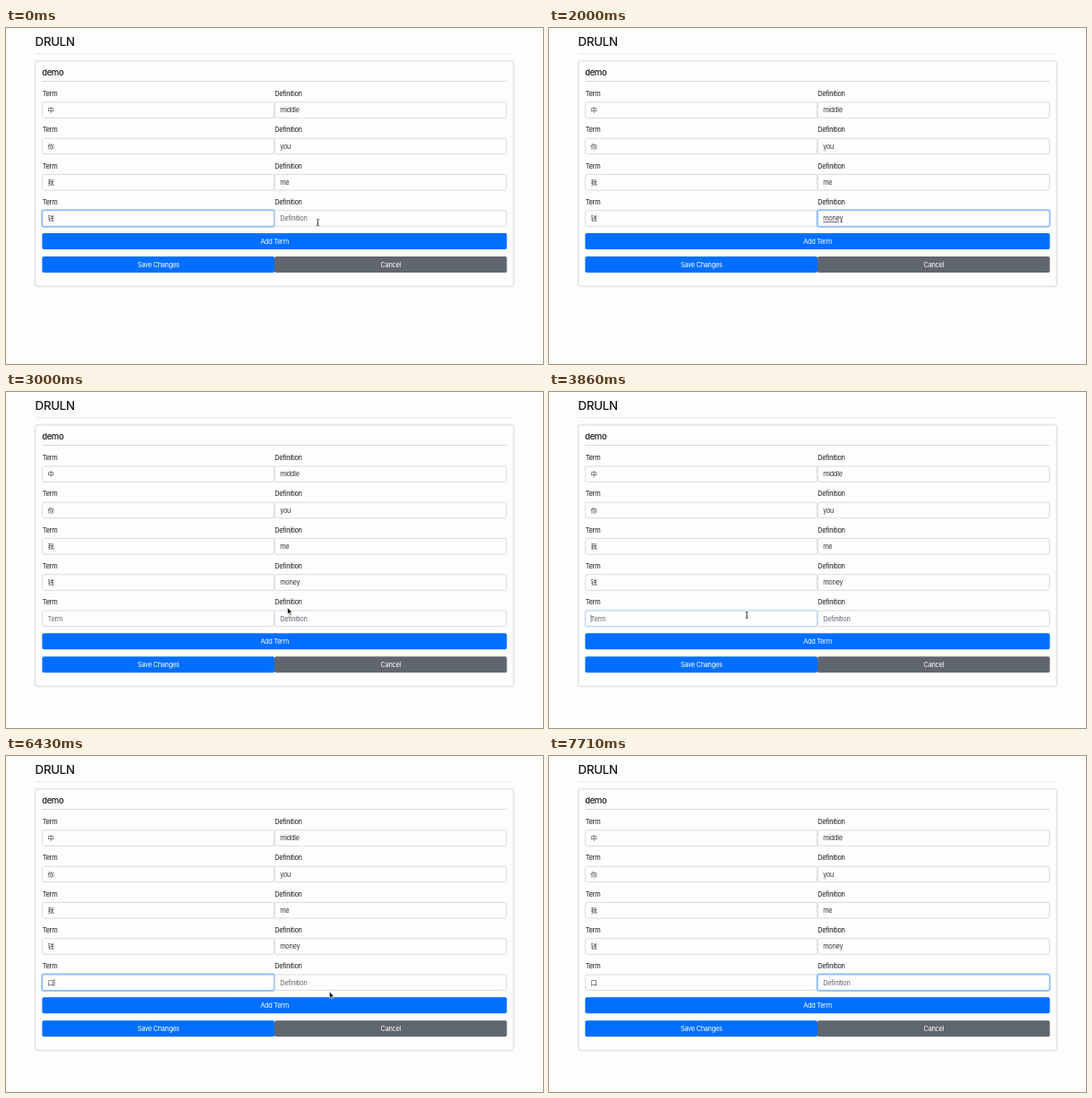
An HTML page that plays this animation: 600x375 px, repeating every 8 s.

```html
<!DOCTYPE html>
<html lang="zh-Hans">
<head>
<meta charset="utf-8">
<title>Flash card editor</title>
<style>
html, body { margin: 0; width: 100%; height: 100%; overflow: hidden; background: #fdfdfd; }
svg { display: block; width: 600px; height: 375px; }
text { font: 7.4px Inter, "Noto Sans CJK SC", "Noto Sans CJK", sans-serif; letter-spacing: -.3px; fill: #15181b; white-space: pre; }
.title { font-size: 13.3px; font-weight: 500; }
.deck { font-size: 9.5px; font-weight: 500; letter-spacing: -.4px; }
.value { fill: #343a40; }
.hint { fill: #626a72; }
.button { fill: #fff; text-anchor: middle; }
.card { fill: #fdfdfd; stroke: #d5d6d7; stroke-width: .7; filter: drop-shadow(0 .8px 1px rgba(0, 0, 0, .16)); }
</style>
</head>
<body>
<svg id="stage" viewBox="0 0 600 375"></svg>
<script>
const LOOP = 8000, STEP = 1000 / 7, PITCH = 40.3;
const BLUE = '#006fff', GREY = '#60666d';
const stage = document.getElementById('stage');

function add(parent, tag, attrs, content) {
  const el = document.createElementNS('http://www.w3.org/2000/svg', tag);
  set(el, attrs);
  if (content) el.textContent = content;
  parent.appendChild(el);
  return el;
}
function set(el, attrs) {
  for (const key in attrs) el.setAttribute(key, attrs[key]);
}
const show = (el, on) => set(el, { visibility: on ? 'visible' : 'hidden' });
const rule = (y, x1, x2, stroke) => add(stage, 'line', { x1, x2, y1: y, y2: y, stroke, 'stroke-width': .8 });
const mix = (a, b, p) => `rgb(${a.map((v, i) => Math.round(v + (b[i] - v) * p))})`;

// Latest value in a list of [step, value] pairs.
function at(list, k) {
  let value = list[0][1];
  for (const [start, v] of list) if (k >= start) value = v;
  return value;
}
// Straight move with ease between [step, x, y] points.
function along(points, k) {
  let i = 0;
  while (i < points.length - 2 && k >= points[i + 1][0]) i++;
  const [a, x, y] = points[i], [b, u, v] = points[i + 1];
  const p = Math.max(0, Math.min(1, (k - a) / (b - a)));
  const e = p * p * (3 - 2 * p);
  return [x + (u - x) * e, y + (v - y) * e];
}

function makeField(parent, x, row, hint, value = '') {
  const y = 82.5 + row * PITCH;
  add(parent, 'text', { x: x + .3, y: y - 6.4 }, hint);
  const ring = add(parent, 'rect', { x: x - .5, y: y - .5, width: 260.2, height: 19, rx: 2.4, fill: 'none', stroke: '#7fb5ff', 'stroke-width': 1.5, opacity: 0 });
  const box = add(parent, 'rect', { x: x + .3, y: y + .3, width: 258.9, height: 17.6, rx: 1.7, fill: '#fdfdfd', stroke: '#ced4da', 'stroke-width': .8 });
  const text = add(parent, 'text', { x: x + 6.2, y: y + 11.8, class: 'value' }, value);
  const caret = add(parent, 'rect', { y: y + 5, width: .6, height: 8.2, fill: '#333', visibility: 'hidden' });
  return { x, ring, box, text, caret, hint };
}
function setField(f, { value, focus = 0, caret = false, marked = false }) {
  f.text.textContent = value || f.hint;
  set(f.text, { class: value ? 'value' : 'hint', 'text-decoration': marked ? 'underline' : 'none' });
  set(f.box, { stroke: mix([206, 212, 218], [112, 172, 250], focus) });
  set(f.ring, { opacity: Math.max(0, focus * 1.6 - .6) * .75 });
  const w = value ? f.text.getComputedTextLength() : 0;
  set(f.caret, { x: f.x + 6.3 + w });
  show(f.caret, caret);
}
function makeButton(x, y, width, label, fill) {
  const box = add(actions, 'rect', { x, y, width, height: 18, rx: 1.8, fill });
  add(actions, 'text', { x: x + width / 2, y: y + 11.7, class: 'button' }, label);
  return box;
}

add(stage, 'rect', { width: 600, height: 375, fill: '#fdfdfd' });
add(stage, 'text', { x: 32.6, y: 19.8, class: 'title' }, 'DRULN');
rule(28.6, 33, 567, '#e3e3e3');
const card = add(stage, 'rect', { x: 33, y: 37, width: 534, height: 251, rx: 2, class: 'card' });
add(stage, 'text', { x: 40.2, y: 53, class: 'deck' }, 'demo');
rule(59.6, 40.5, 559.5, '#c9cacb');

const actions = add(stage, 'g', {});
const addTerm = makeButton(40.4, 229, 519.2, 'Add Term', BLUE);
makeButton(40.4, 255, 259.6, 'Save Changes', BLUE);
makeButton(300, 255, 259.6, 'Cancel', GREY);

const makeRow = (parent, row, term, meaning) => [
  makeField(parent, 40.4, row, 'Term', term),
  makeField(parent, 300, row, 'Definition', meaning)
];
[['中', 'middle'], ['你', 'you'], ['我', 'me']].forEach((pair, i) => makeRow(stage, i, ...pair));
const [term4, def4] = makeRow(stage, 3, '钱');
const extra = add(stage, 'g', {});
const [term5, def5] = makeRow(extra, 4);

const arrow = add(stage, 'path', { d: 'M0 0V7.2L1.7 5.7L2.8 8.2L4 7.6L2.9 5.3H5.1Z', fill: '#000', stroke: '#fff', 'stroke-width': .6 });
const beam = add(stage, 'path', { d: 'M-1.5-3.5Q0-3.5 0-2.6Q0-3.5 1.5-3.5M0-2.8V2.8M-1.5 3.5Q0 3.5 0 2.6Q0 3.5 1.5 3.5M-.8 .9H.8', fill: 'none', stroke: '#222', 'stroke-width': .8 });

const money = [[0, ''], [5, 'm'], [6, 'mo'], [8, 'mon'], [9, 'mone'], [11, 'money']];
const mouth = [[0, ''], [39, 'k'], [40, 'ko'], [42, 'kou'], [43, '口']];
const focus = {
  term4: [[0, 1], [1, .4], [2, 0]],
  def4: [[0, 0], [1, .5], [2, 1], [20, .35], [21, 0]],
  term5: [[0, 0], [27, .45], [28, 1], [49, .4], [50, 0]],
  def5: [[0, 0], [49, .5], [50, 1]]
};
const def4Caret = [[0, false], [2, true], [13, false], [16, true], [18, false]];
const term5Caret = [[0, false], [27, true], [31, false], [35, true], [37, false], [39, true], [47, false]];
const def5Caret = [[0, false], [50, true], [54, false]];
const pointer = [[0, ''], [0, 'beam'], [5, ''], [16, 'beam'], [18, 'arrow'], [23, 'beam'], [30, ''], [44, 'arrow'], [46, 'beam'], [52, '']];
const path = [[0, 348.4, 217], [15, 348.4, 217], [19, 314.6, 240.8], [21, 314.6, 240.8], [26, 221, 249],
  [43, 221, 249], [43.5, 352, 271], [45, 361.4, 263], [48, 366, 254], [55, 366, 254]];

function draw(time) {
  const k = Math.floor((time % LOOP + 5) / STEP);
  const grown = k >= 21;
  show(extra, grown);
  set(card, { height: 251 + (grown ? PITCH : 0) });
  set(actions, { transform: `translate(0 ${grown ? PITCH : 0})` });
  set(addTerm, { fill: at([[0, BLUE], [18, '#005fdc'], [20, '#0059cf'], [21, BLUE]], k) });

  setField(term4, { value: '钱', focus: at(focus.term4, k) });
  setField(def4, { value: at(money, k), focus: at(focus.def4, k), caret: at(def4Caret, k), marked: k >= 5 && k < 15 });
  setField(term5, { value: at(mouth, k), focus: at(focus.term5, k), caret: grown && at(term5Caret, k), marked: k >= 39 && k < 43 });
  setField(def5, { value: '', focus: at(focus.def5, k), caret: grown && at(def5Caret, k) });

  const [x, y] = along(path, k), shape = at(pointer, k);
  for (const [el, name] of [[arrow, 'arrow'], [beam, 'beam']]) {
    set(el, { transform: `translate(${x} ${y})` });
    show(el, shape === name);
  }
}

const start = performance.now();
function tick() {
  draw(performance.now() - start);
  requestAnimationFrame(tick);
}
tick();
</script>
</body>
</html>
```
